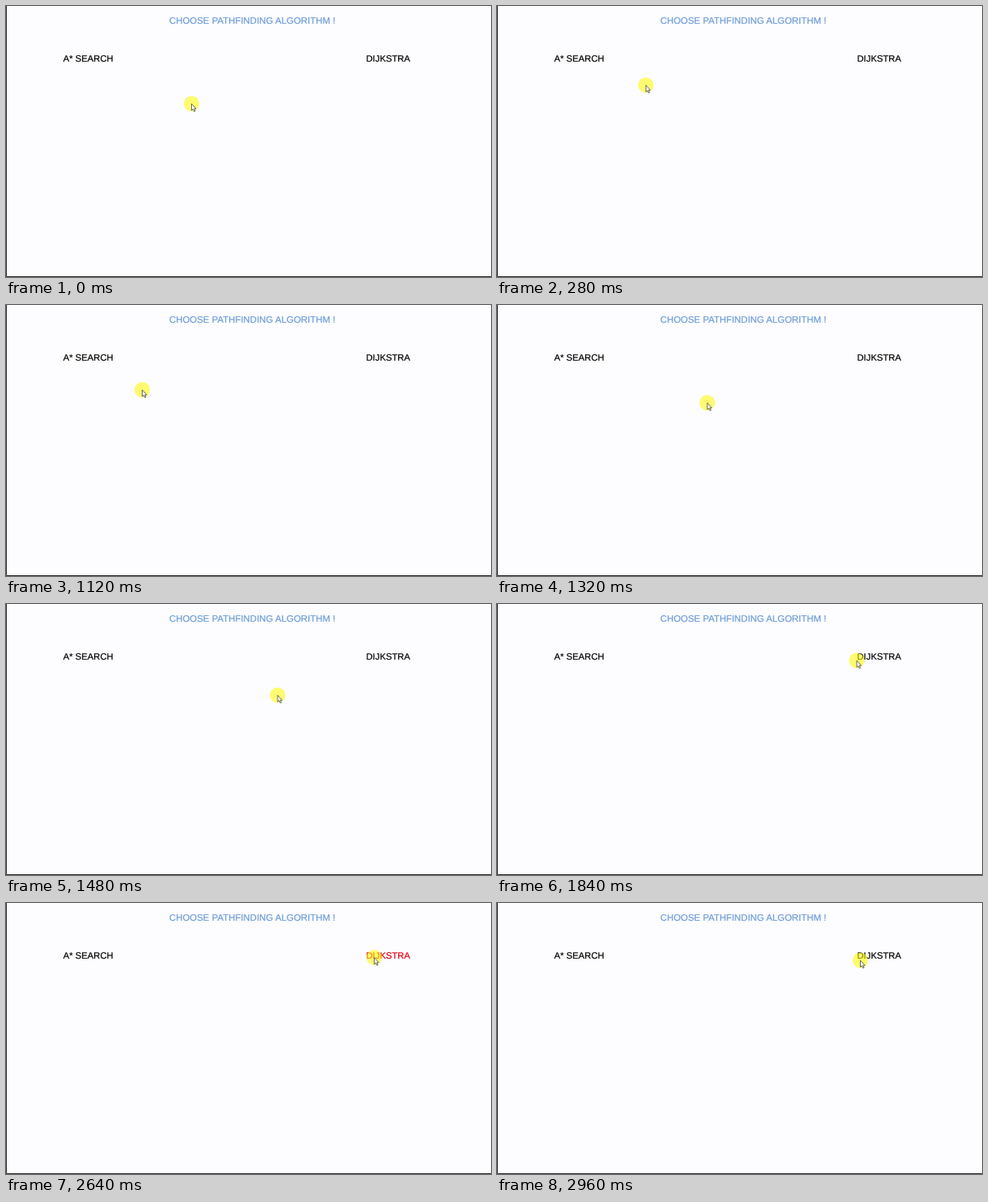
These frames come from a looping animation (600x336 px, 3 s). An HTML page:

```html
<!DOCTYPE html>
<html lang="en">
<head>
<meta charset="utf-8">
<title>Choose pathfinding algorithm</title>
<style>
  html, body { margin: 0; width: 100%; height: 100%; overflow: hidden; background: #fdfcfe; }
  svg { display: block; }
  text {
    font: 11.25px "Liberation Sans", Arial, sans-serif;
    text-rendering: geometricPrecision;
    stroke: currentColor; fill: currentColor; stroke-width: .2;
  }
  .title { font-size: 11.45px; color: #6c9cd8; }
</style>
</head>
<body>
<svg width="600" height="336" viewBox="0 0 600 336">
  <path d="M.5 0V335.5H600" fill="none" stroke="#2a2a2a"/>
  <text class="title" x="201.9" y="21.7">CHOOSE PATHFINDING ALGORITHM !</text>
  <text class="item" x="70.8" y="68.5">A* SEARCH</text>
  <text class="item" x="445.5" y="68.5">DIJKSTRA</text>
  <g id="pointer">
    <circle r="9.6" fill="#fffa00" fill-opacity=".56"/>
    <path d="M0 .2V8.4L1.9 6.8L3.3 9.8L4.6 9.2L3.3 6.3H5.6Z" fill="#fff" stroke="#444" stroke-width=".8"/>
  </g>
</svg>
<script>
const LOOP = 3000, STEP = 40;

// Key points of the pointer's path; a repeated point is a rest
const path = [
  { t: 0, x: 229.5, y: 121 },
  { t: 640, x: 118, y: 64.5 },
  { t: 800, x: 118, y: 64.5 },
  { t: 1120, x: 168.5, y: 105 },
  { t: 1360, x: 280, y: 122 },
  { t: 1480, x: 336, y: 113 },
  { t: 1840, x: 445, y: 70 },
  { t: 2240, x: 455.5, y: 67.5 },
  { t: 2840, x: 455.5, y: 67.5 },
  { t: 2960, x: 449.5, y: 71 }
];
const pointer = document.getElementById("pointer");
const items = [...document.querySelectorAll(".item")];

const slope = (a, b, axis) => (b[axis] - a[axis]) / (b.t - a.t);

// Harmonic mean of the neighbouring slopes, so the curve never overshoots
function tangent(i, axis) {
  if (i === 0 || i === path.length - 1) return 0;
  const before = slope(path[i - 1], path[i], axis);
  const after = slope(path[i], path[i + 1], axis);
  return before * after > 0 ? 2 * before * after / (before + after) : 0;
}

function position(t, axis) {
  const next = path.findIndex((key, i) => i > 0 && t <= key.t);
  const a = path[next - 1], b = path[next], span = b.t - a.t;
  const u = (t - a.t) / span, v = 1 - u;
  return v * v * (1 + 2 * u) * a[axis] + u * u * (3 - 2 * u) * b[axis]
    + span * u * v * (v * tangent(next - 1, axis) - u * tangent(next, axis));
}

function draw() {
  const t = Math.floor(performance.now() % LOOP / STEP) * STEP;
  const x = position(t, "x"), y = position(t, "y");
  pointer.setAttribute("transform", `translate(${x} ${y})`);
  for (const item of items) {
    const left = +item.getAttribute("x");
    const hover = x > left && x < left + 62 && Math.abs(y - 64) < 6;
    item.style.color = hover ? "#e00010" : "#000";
  }
  requestAnimationFrame(draw);
}
draw();
</script>
</body>
</html>
```
